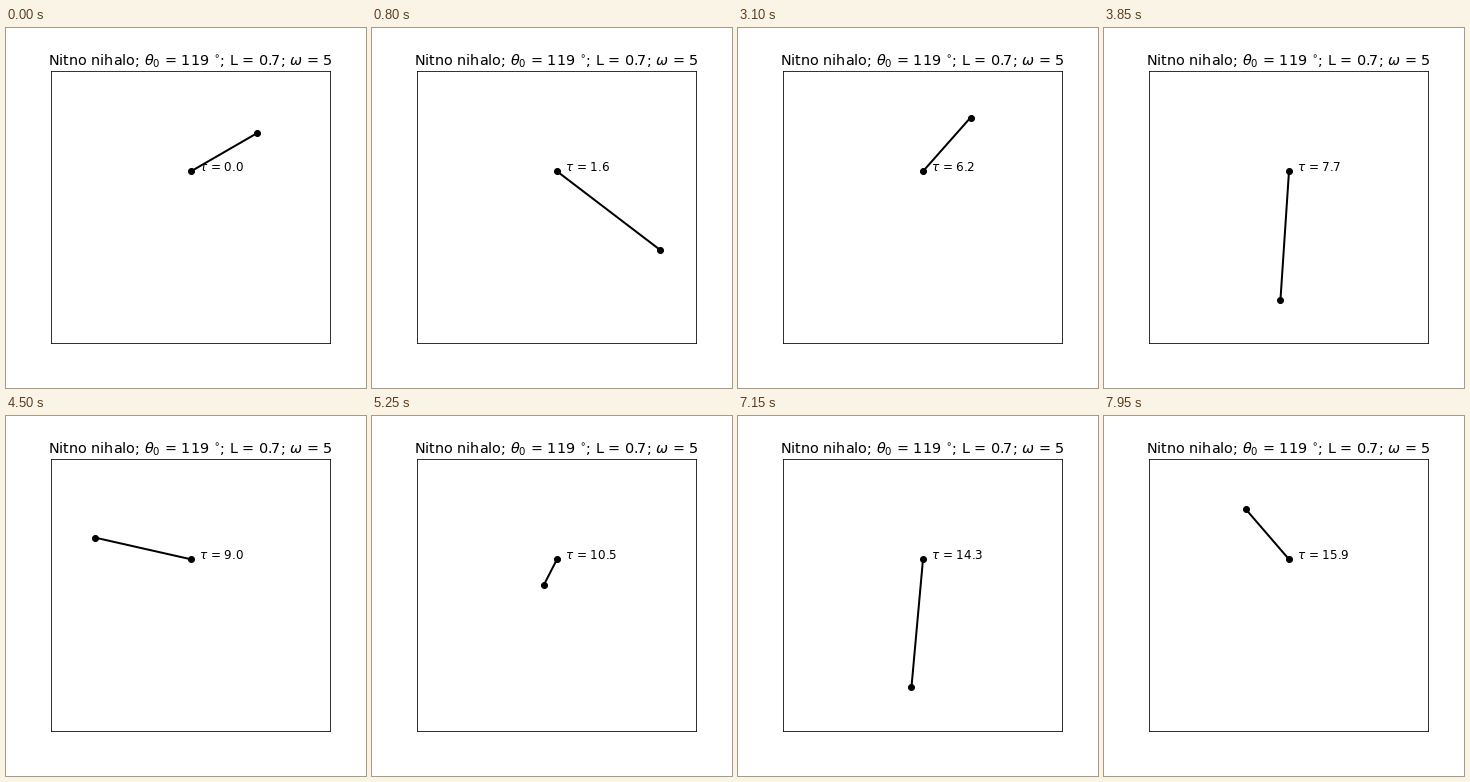
A matplotlib script for the animation above (8000 ms loop, 360 px wide and 360 px high).

```python
import numpy as np
import matplotlib.pyplot as plt
from matplotlib.animation import FuncAnimation

THETA0, AMP, OMEGA = 2 * np.pi / 3, 0.7, 5
FRAMES, STEP, SUBSTEPS = 160, 0.1, 40

# axes box, pivot and scale in pixels, y measured from the top
LEFT, TOP, RIGHT, BOTTOM = 45, 43.2, 324, 315
PIVOT_X, PIVOT_Y, UNIT = 185.0, 143.3, 76.1


def length(tau):
    return 1 + AMP * np.sin(tau)


def slope(tau, state):
    theta, spin = state
    r, dr = length(tau), AMP * np.cos(tau)
    return np.array([spin, -(2 * dr * spin + OMEGA**2 * np.sin(theta)) / r])


def rk4(tau, s, h):
    a = slope(tau, s)
    b = slope(tau + h / 2, s + h / 2 * a)
    c = slope(tau + h / 2, s + h / 2 * b)
    d = slope(tau + h, s + h * c)
    return s + h / 6 * (a + 2 * b + 2 * c + d)


def solve():
    state = np.array([THETA0, 0.0])
    h = STEP / SUBSTEPS
    angles = []
    for i in range(FRAMES):
        angles.append(state[0])
        for j in range(SUBSTEPS):
            state = rk4(i * STEP + j * h, state, h)
    return np.array(angles)


taus = np.arange(FRAMES) * STEP
theta = solve()
xs = length(taus) * np.sin(theta)
ys = -length(taus) * np.cos(theta)

plt.rcParams["font.family"] = "DejaVu Sans"
plt.rcParams["font.size"] = 12

fig = plt.figure(figsize=(5, 5), dpi=72, facecolor="white")
ax = fig.add_axes([LEFT / 360, 1 - BOTTOM / 360,
                   (RIGHT - LEFT) / 360, (BOTTOM - TOP) / 360])
ax.set_xlim((LEFT - PIVOT_X) / UNIT, (RIGHT - PIVOT_X) / UNIT)
ax.set_ylim((PIVOT_Y - BOTTOM) / UNIT, (PIVOT_Y - TOP) / UNIT)
ax.set_xticks([])
ax.set_yticks([])
# the label shows the angle cut down to whole degrees
ax.set_title(r"Nitno nihalo; $\theta_0$ = 119 $^{\circ}$; "
             rf"L = {AMP}; $\omega$ = {OMEGA}", fontsize=14.4)

rod, = ax.plot([], [], "ko-", lw=2, ms=6)
clock = ax.text(0.1, 0, "")


def update(i):
    rod.set_data([0, xs[i]], [0, ys[i]])
    clock.set_text(rf"$\tau$ = {taus[i]:.1f}")
    return rod, clock


anim = FuncAnimation(fig, update, frames=FRAMES, interval=50,
                     repeat=True, repeat_delay=0)
plt.show()
```
